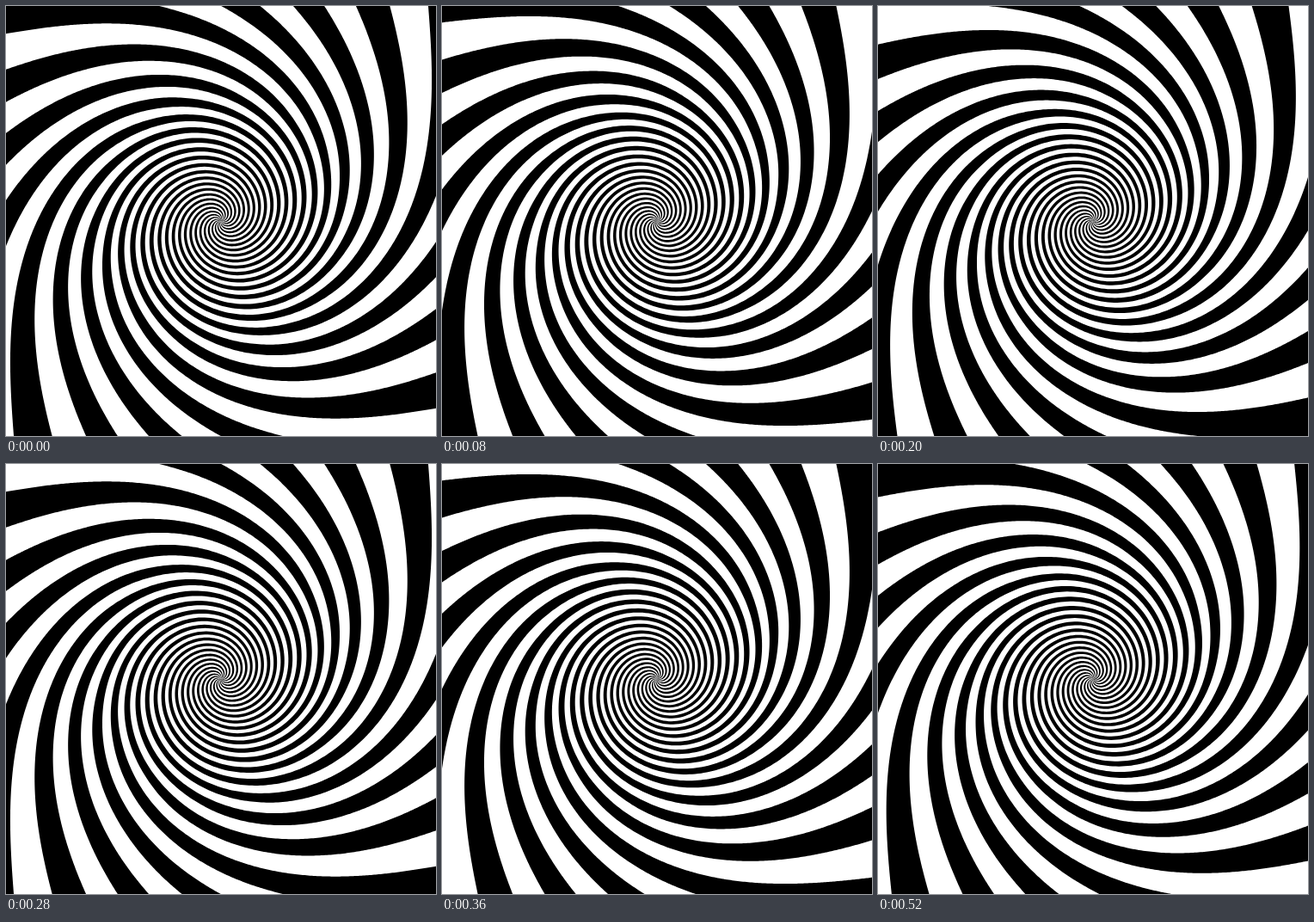
These frames come from a looping animation (500 by 500 pixels, 560 ms). An HTML page with a canvas:

```html
<!DOCTYPE html>
<html lang="en">
<head>
<meta charset="utf-8">
<title>Spiral</title>
<style>
  html, body { margin: 0; width: 100%; height: 100%; overflow: hidden; background: #fff; }
  canvas { display: block; width: 100vw; height: 100vh; }
</style>
</head>
<body>
<canvas id="stage" width="500" height="500"></canvas>
<script>
const ctx = document.getElementById('stage').getContext('2d');

const SIZE = 500;
const CENTER = SIZE / 2;
const REACH = 362;        // just past the corners
const ARMS = 15;
const ARM_ANGLE = 2 * Math.PI / ARMS;
const START_ANGLE = 1.745;
const STEP_MS = 40;
const STEPS = 14;

// A wide curl that fades outward, plus a tighter twirl in the core.
function twist(r) {
  const curl = 7.27 * Math.exp(-r / 118);
  const core = 1.95 * Math.max(0, 1 - r / 150) ** 2;
  return curl + core;
}

function edgePoint(angle, r) {
  const a = angle + twist(r);
  ctx.lineTo(CENTER + r * Math.cos(a), CENTER + r * Math.sin(a));
}

function addArm(angle) {
  ctx.moveTo(CENTER, CENTER);
  for (let r = 0; r <= REACH; r++) edgePoint(angle, r);
  for (let r = REACH; r >= 0; r--) edgePoint(angle + ARM_ANGLE / 2, r);
  ctx.closePath();
}

function draw(step) {
  const turn = START_ANGLE + ARM_ANGLE * step / STEPS;
  ctx.fillStyle = '#fff';
  ctx.fillRect(0, 0, SIZE, SIZE);
  ctx.fillStyle = '#000';
  ctx.beginPath();
  for (let i = 0; i < ARMS; i++) addArm(turn + i * ARM_ANGLE);
  ctx.fill();
}

const start = performance.now();
let shown = 0;

function tick() {
  const step = Math.floor((performance.now() - start) / STEP_MS) % STEPS;
  if (step !== shown) draw(shown = step);
  requestAnimationFrame(tick);
}

draw(0);
requestAnimationFrame(tick);
</script>
</body>
</html>
```
